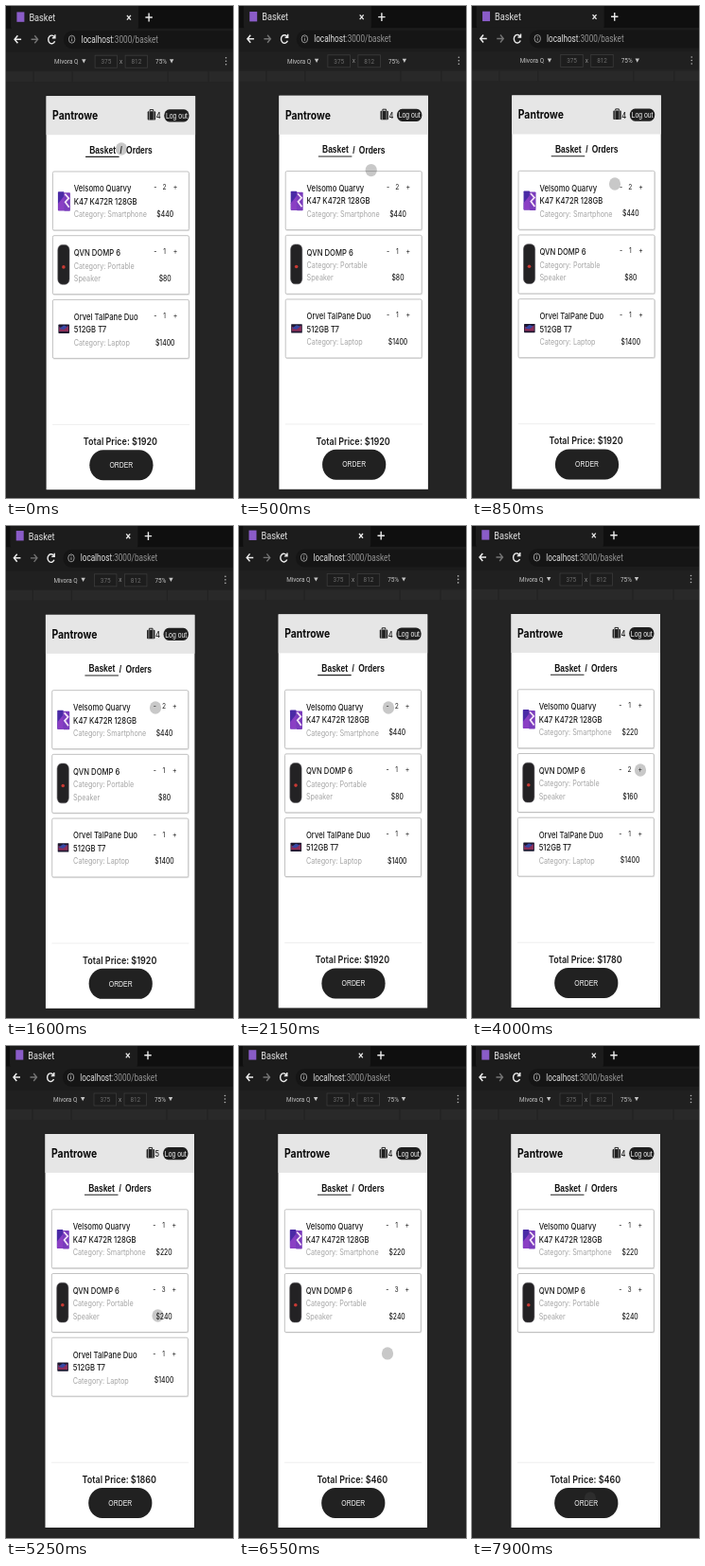
Recreate the animation shown at these times as an HTML page. Size 240x520 px, loop 8000 ms.

```html
<!DOCTYPE html>
<html lang="en">
<head>
<meta charset="utf-8">
<title>Basket</title>
<style>
  html, body { margin: 0; width: 100%; height: 100%; overflow: hidden; background: #242424; }
  svg { display: block; width: 240px; height: 520px; }
  .ui { font-family: Roboto, "Open Sans", sans-serif; }
  .page { font-family: Inter, "Open Sans", sans-serif; }
  .plain { font-family: "Liberation Sans", Arial, sans-serif; }
</style>
</head>
<body>
<svg id="stage" viewBox="0 0 240 520"></svg>
<script>
const LOOP = 8000;
const SQUEEZE = 0.82;
const stage = document.getElementById('stage');

function add(parent, tag, attrs, content) {
  const node = document.createElementNS('http://www.w3.org/2000/svg', tag);
  for (const key in attrs) node.setAttribute(key, attrs[key]);
  if (content !== undefined) node.textContent = content;
  return parent.appendChild(node);
}
const rect = (parent, x, y, width, height, fill, more = {}) =>
  add(parent, 'rect', { x, y, width, height, fill, ...more });
const path = (parent, d, stroke, width = 1, fill = 'none') =>
  add(parent, 'path', { d, stroke, fill, 'stroke-width': width });
const label = (parent, kind, x, y, size, fill, content, more = {}) =>
  add(parent, 'text', {
    class: kind, transform: `translate(${x} ${y}) scale(${SQUEEZE} 1)`,
    'font-size': size, fill, ...more
  }, content);
const MID = { 'text-anchor': 'middle' };

const screen = add(stage, 'g', {});
drawBrowser(screen);
const bagCount = drawPageHeader(screen);
const cards = [
  drawCard(172.5, ['Velsomo Quarvy', 'K47 K472R 128GB'], ['Category: Smartphone'], drawPhone),
  drawCard(240.2, ['QVN DOMP 6'], ['Category: Portable', 'Speaker'], drawSpeaker),
  drawCard(307.9, ['Orvel TalPane Duo', '512GB T7'], ['Category: Laptop'], drawLaptop)
];
const total = drawFooter(screen);
const pointer = add(stage, 'ellipse', { rx: 6.1, ry: 6.7, fill: '#484848', 'fill-opacity': 0.3 });

function drawBrowser(g) {
  rect(g, -5, -5, 250, 27, '#0f0f0f');
  rect(g, 4, -5, 135, 28, '#1c1c1c', { rx: 4 });
  rect(g, -5, 21.5, 250, 25.5, '#1c1c1c');
  rect(g, 60, 24, 190, 19, '#151515', { rx: 9 });
  rect(g, -5, 47, 250, 19, '#202020');
  rect(g, -5, 66, 250, 12, '#292929');
  path(g, 'M-5 66.5H245M28 67V78M69 67V78M170 67V78M213 67V78', '#202020', 0.8);
  rect(g, -5, 78, 250, 450, '#242424');

  rect(g, 10.3, 4.2, 8, 10.4, '#8a5cc8');
  label(g, 'ui', 23.3, 13.7, 11.2, '#e0e0e0', 'Basket');
  path(g, 'M126.8 7.6l4 4.8M130.8 7.6l-4 4.8', '#ececec', 1.3);
  path(g, 'M146.3 9.8h7.4M150 5.4v8.8', '#ececec', 1.4);
  path(g, 'M15 33H8.3M11.3 29l-3.3 4 3.3 4', '#ececec', 1.5);
  path(g, 'M25.5 33h6.7M29.2 29l3.3 4-3.3 4', '#747474', 1.4);
  path(g, 'M50.3 31A3.6 4.3 0 1 0 50.5 35M50.8 28v3.5h-3', '#ececec', 1.4);
  add(g, 'ellipse', { cx: 68.5, cy: 33, rx: 3.2, ry: 4, fill: 'none', stroke: '#a6a6a6', 'stroke-width': 0.9 });
  path(g, 'M68.5 32.3v2.8M68.5 30.4v1', '#a6a6a6', 0.9);
  const url = label(g, 'ui', 78.3, 36.6, 10, '#dedede', 'localhost');
  add(url, 'tspan', { fill: '#929292' }, ':3000/basket');

  label(g, 'ui', 50, 58.8, 7.8, '#c5c5c5', 'Mivora Q');
  label(g, 'ui', 157, 58.8, 7.8, '#c5c5c5', '75%');
  for (const x of [79, 171.8]) path(g, `M${x} 54h4.4l-2.2 4.2z`, 'none', 0, '#c5c5c5');
  [[93, '375'], [125, '812']].forEach(([x, size]) => {
    rect(g, x, 50, 23.5, 13, '#1d1d1d', { stroke: '#3b3b3b', 'stroke-width': 0.8 });
    label(g, 'ui', x + 11.8, 59, 7.8, '#6c6c6c', size, MID);
  });
  label(g, 'ui', 120.5, 58.6, 7.8, '#909090', 'x', MID);
  for (const y of [52.5, 56, 59.5]) add(g, 'circle', { cx: 231.5, cy: y, r: 0.8, fill: '#b8b8b8' });
}

function drawPageHeader(g) {
  rect(g, 41.5, 93, 157.5, 416, '#fff');
  rect(g, 41.5, 93, 157.5, 41, '#e6e6e6');
  label(g, 'page', 48, 118, 12.7, '#0c0c0c', 'Pantrowe', { 'font-weight': 700 });

  rect(g, 148.6, 109, 8.4, 9.4, '#222', { rx: 1 });
  path(g, 'M151 109v-1.6h3.6v1.6', '#222', 1);
  path(g, 'M150.5 109v9.4M155.1 109v9.4', '#e6e6e6', 0.5);
  const count = label(g, 'page', 157.6, 117.2, 9.2, '#222', '', { 'font-weight': 500 });
  rect(g, 166.1, 107, 26.4, 13.2, '#1f1f1f', { rx: 5.5, ry: 6.6 });
  label(g, 'plain', 179.3, 116.7, 8.4, '#f2f2f2', 'Log out', MID);

  const bold = { ...MID, 'font-weight': 700 };
  label(g, 'plain', 101, 153.6, 10.3, '#111', 'Basket', bold);
  label(g, 'plain', 120.6, 153.8, 10.3, '#111', '/', bold);
  label(g, 'plain', 139.8, 154, 10.3, '#111', 'Orders', bold);
  path(g, 'M83 157.2H118.5', '#222', 1.1);
  return count;
}

function drawCard(top, names, notes, drawPicture) {
  const g = add(screen, 'g', { transform: `translate(0 ${top})` });
  rect(g, 48.4, 0.8, 144.8, 62.6, '#e4e4e4', { rx: 1.5 });
  rect(g, 48.3, 0.3, 144, 62, '#fff', { rx: 1.5, stroke: '#bcbcbc', 'stroke-width': 0.9 });
  drawPicture(g);
  let y = 21.7;
  names.forEach(line => {
    label(g, 'page', 70.7, y, 9.4, '#1c1c1c', line, { 'font-weight': 500 });
    y += 13.5;
  });
  notes.forEach(line => {
    label(g, 'page', 70.7, y, 8.8, '#a6a6a6', line);
    y += 13.3;
  });
  label(g, 'page', 156.8, 19.8, 8.4, '#222', '-', MID);
  label(g, 'page', 177.8, 19.8, 8.4, '#222', '+', MID);
  return {
    g,
    amount: label(g, 'page', 166.5, 19.8, 8.2, '#222', '', MID),
    price: label(g, 'page', 167.1, 48.5, 8.3, '#1c1c1c', '', { ...MID, 'font-weight': 500 })
  };
}

function drawPhone(g) {
  rect(g, 53.8, 21.5, 6.6, 20, '#4a2aa6', { rx: 0.8 });
  path(g, 'M54 34l6.4-8v15.5H54z', 'none', 0, '#8a3fc4');
  rect(g, 60, 22.5, 6.8, 19.5, '#7a3cbc', { rx: 0.8 });
  path(g, 'M61.2 24l4 4.5-3.6 4 4 5.5', '#f3e2f6', 1.8);
}

function drawSpeaker(g) {
  rect(g, 53.7, 10, 12.2, 41.8, '#232224', { rx: 4.5, ry: 5.5, stroke: '#57555a', 'stroke-width': 0.6 });
  add(g, 'circle', { cx: 59.8, cy: 33.5, r: 1.8, fill: '#c93a34' });
}

function drawLaptop(g) {
  rect(g, 54.3, 26.5, 11.6, 9.3, '#1c1830', { rx: 0.6 });
  path(g, 'M55 34v-5l4 2 6-3v6z', 'none', 0, '#8b2d58');
  path(g, 'M55 31l5-3.5 4 1.5-4 3z', 'none', 0, '#3647a5');
}

function drawFooter(g) {
  path(g, 'M48 440.2H193', '#ececec', 0.9);
  const sum = label(g, 'page', 119.8, 462, 11, '#1c1c1c', '', { ...MID, 'font-weight': 600 });
  rect(g, 87.2, 467, 67.2, 32, '#212121', { rx: 14.5, ry: 16 });
  label(g, 'plain', 120.8, 485.7, 8.4, '#f4f4f4', 'ORDER', MID);
  return sum;
}

const PRICES = [220, 80, 1400];
// time, then how many of each product
const BASKET = [
  [0, 2, 1, 1], [2600, 1, 1, 1], [3950, 1, 2, 1], [4350, 1, 3, 1], [6200, 1, 3, 0]
];
// time, x, y of the pointer
const POINTER = [
  [0, 122, 151], [850, 151, 188], [1600, 158, 192], [2600, 158, 192],
  [2800, 164, 236], [3300, 178, 258], [5000, 178, 258], [5250, 160.5, 285],
  [5550, 157, 324.5], [6800, 157, 325], [7150, 131, 391], [7350, 131, 391],
  [7900, 125, 478], [LOOP, 125, 478]
];
let shownStep = null;

function showBasket(step) {
  if (step === shownStep) return;
  shownStep = step;
  const amounts = step.slice(1);
  let sum = 0;
  cards.forEach((card, i) => {
    const cost = amounts[i] * PRICES[i];
    sum += cost;
    card.g.setAttribute('visibility', amounts[i] ? 'visible' : 'hidden');
    card.amount.textContent = amounts[i];
    card.price.textContent = '$' + cost;
  });
  bagCount.textContent = amounts.reduce((a, b) => a + b);
  total.textContent = 'Total Price: $' + sum;
}

function pointerAt(t) {
  const next = POINTER.findIndex(key => key[0] > t);
  const [t0, x0, y0] = POINTER[next - 1];
  const [t1, x1, y1] = POINTER[next];
  const p = (t - t0) / (t1 - t0);
  const k = p * (0.5 + p * (1.5 - p)); // mild ease at both ends
  return [x0 + (x1 - x0) * k, y0 + (y1 - y0) * k];
}

function render(t) {
  const drift = Math.max(0, 1 - t / 2600);
  screen.setAttribute('transform', `translate(${1.1 * drift} ${2.2 * drift})`);
  showBasket(BASKET.filter(step => step[0] <= t).pop());
  const [x, y] = pointerAt(t);
  pointer.setAttribute('cx', x);
  pointer.setAttribute('cy', y);
}

const start = performance.now();
function tick() {
  render((performance.now() - start) % LOOP);
  requestAnimationFrame(tick);
}
tick();
</script>
</body>
</html>
```
